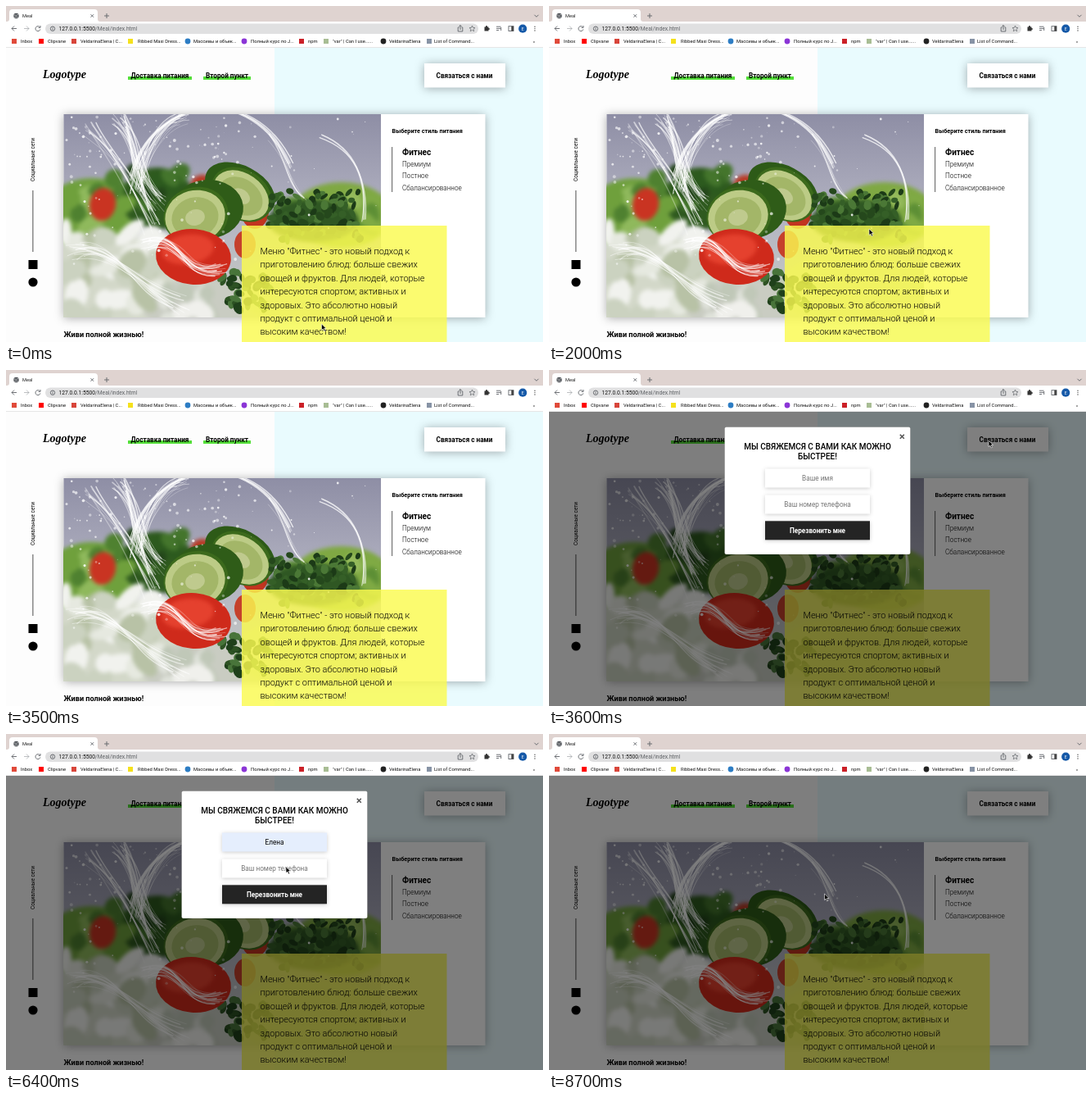
Write an HTML page that moves like this. It is 656 by 410 pixels and loops after 9000 ms.

```html
<!DOCTYPE html>
<html lang="ru">
<head>
<meta charset="utf-8">
<title>Meal</title>
<style>
html, body { margin: 0; width: 100%; height: 100%; overflow: hidden; background: #fff; }
svg { display: block; width: 656px; height: 410px; font-family: Roboto, sans-serif; }
text { white-space: pre; }
.card { filter: drop-shadow(0 1px 6px rgba(0, 0, 0, .32)); }
.field { filter: drop-shadow(0 1px 2.5px rgba(0, 0, 0, .2)); }
.soft { filter: blur(2.5px); }
.line { fill: none; stroke: #fff; stroke-linecap: round; }
.icon { fill: none; stroke: #5f6368; stroke-width: .9; }
</style>
</head>
<body>
<svg id="stage" viewBox="0 0 656 410"></svg>
<script>
const stage = document.getElementById('stage');
let seed = 11;
const rnd = (a, b) => {
  seed = (seed * 16807) % 2147483647;
  return a + (b - a) * seed / 2147483647;
};
const text = (x, y, s, size, weight = 400, attrs = '') =>
  `<text x="${x}" y="${y}" font-size="${size}" font-weight="${weight}" ${attrs}>${s}</text>`;
const mid = (y, s, size, weight, fill, id = '') =>
  text(328, y, s, size, weight, `text-anchor="middle" fill="${fill}" ${id && `id="${id}"`}`);
const rect = (x, y, w, h, fill, attrs = '') =>
  `<rect x="${x}" y="${y}" width="${w}" height="${h}" fill="${fill}" ${attrs}/>`;
const dot = (x, y, r, fill, attrs = '') =>
  `<circle cx="${x}" cy="${y}" r="${r}" fill="${fill}" ${attrs}/>`;
const oval = (x, y, rx, ry, turn, fill, attrs = '') =>
  `<ellipse rx="${rx}" ry="${ry}" fill="${fill}" transform="translate(${x} ${y}) rotate(${turn})" ${attrs}/>`;
const icon = (d, attrs = '') => `<path class="icon" d="${d}" ${attrs}/>`;
const repeat = (n, f) => Array.from({length: n}, (_, i) => f(i)).join('');

// Leaves scattered over a box
const leaves = (n, x, y, w, h, r, colors) => repeat(n, i =>
  oval(rnd(x, x + w), rnd(y, y + h), rnd(r / 2, r), rnd(r / 3, r * .7), rnd(0, 180), colors[i % colors.length]));
const slice = (x, y, rx, ry, turn) =>
  oval(x, y, rx, ry, turn, '#3c6a1c') + oval(x - 1, y + 1, rx - 3, ry - 3, turn, '#bccb86') +
  oval(x - 1, y + 2, rx * .72, ry * .7, turn, '#a3b668') + oval(x - 1, y + 2, rx * .3, ry * .28, turn, '#bfca8e');
// A bundle of thin water strands around one curve
const splash = (n, spread, points) => repeat(n, () => {
  const p = points.map(v => v + rnd(-spread, spread));
  return `<path class="line" d="M${p.slice(0, 2)}C${p.slice(2)}" stroke-width="${rnd(.4, 1.8)}" opacity="${rnd(.25, .75)}"/>`;
});

const photo = () => `<g clip-path="url(#frame)">
  ${rect(70, 132, 388, 248, 'url(#sky)')}
  <g class="soft">
    ${oval(105, 255, 60, 45, 0, '#70a03f')}${oval(185, 235, 45, 38, 0, '#2f5a1f')}
    ${leaves(16, 72, 210, 75, 60, 20, ['#6fa03c', '#8fb95c', '#4f8130'])}
    ${leaves(12, 155, 200, 60, 55, 16, ['#2c5a1e', '#44752c', '#23451a'])}
    ${oval(410, 255, 62, 40, 0, '#7fa843')}
    ${leaves(16, 345, 225, 110, 45, 20, ['#7faa44', '#94ba5b', '#5d8f35'])}
    ${oval(118, 242, 16, 20, 10, '#c93422')}${oval(240, 218, 14, 12, 0, '#b83a25')}
  </g>
  ${oval(304, 250, 17, 22, 0, '#c23420')}
  ${oval(286, 224, 46, 29, 28, '#2d5a17')}${slice(288, 230, 40, 30, 35)}
  ${oval(246, 248, 44, 36, -5, '#2f5c18')}${slice(232, 256, 40, 35, -15)}
  <g class="soft">
    ${oval(125, 340, 85, 62, 0, '#d3d8c9')}${oval(235, 365, 70, 32, 0, '#c9ccc2')}
    ${leaves(34, 72, 275, 125, 105, 22, ['#e6e9e0', '#cbd2c0', '#f1f2ee', '#b8c2a6'])}
    ${leaves(12, 190, 345, 85, 38, 16, ['#dfe2da', '#c0c8b8', '#f0f0ec'])}
    ${oval(375, 262, 55, 26, 0, '#2f5723')}${oval(375, 345, 95, 45, 0, '#c3cdb0')}
  </g>
  ${leaves(100, 318, 225, 115, 60, 7, ['#25481c', '#355f27', '#1c3a17', '#4b7836'])}
  ${leaves(45, 262, 325, 60, 45, 8, ['#2d5223', '#48743a', '#1f401b'])}
  ${oval(229, 306, 46, 34, 5, '#cf2a1b')}${oval(222, 297, 32, 18, -8, '#e5412e', 'class="soft"')}
  ${oval(292, 291, 13, 17, 0, '#c5402c')}
  ${splash(9, 4, [155, 210, 175, 110, 300, 90, 347, 195])}
  ${splash(4, 5, [325, 160, 345, 190, 345, 220, 362, 234])}
  ${splash(4, 3, [385, 160, 425, 175, 442, 210, 436, 262])}
  ${splash(24, 11, [140, 140, 165, 170, 155, 200, 185, 240])}
  ${splash(16, 9, [215, 136, 185, 145, 165, 185, 160, 225])}
  ${splash(10, 10, [100, 150, 130, 180, 150, 205, 178, 270])}
  ${splash(14, 8, [172, 290, 215, 275, 210, 330, 262, 322])}
  ${splash(14, 12, [85, 300, 130, 290, 160, 340, 215, 365])}
  ${repeat(150, i => dot(rnd(74, i % 3 ? 270 : 455), rnd(134, i % 2 ? 215 : 320), rnd(.4, 2), '#fff', `opacity="${rnd(.3, .85)}"`))}
</g>`;

const bookmarks = [
  [10, 18, '#e04a3a', 'Inbox'],
  [43, 51, '#f00', 'Clipvane'],
  [83, 91, '#d8453a', 'VeldarinaElena | C...'],
  [152, 161, '#f5e11c', 'Ribbed Maxi Dress...'],
  [222, 229, '#2d7dc4', 'Массивы и объек...', 1],
  [291, 299, '#8b35d6', 'Полный курс по J...', 1],
  [361, 369, '#cb2027', 'npm'],
  [391, 399, '#a8bd94', '"var" | Can I use......'],
  [461, 468, '#222', 'VeldarinaElena', 1],
  [517, 523, '#8793a5', 'List of Command...']
];

const browser = () => `
  ${rect(0, 0, 656, 51, '#fff')}${rect(0, 0, 656, 19, '#dfd3d0')}
  <path d="M1 19q3 0 3-3V8q0-4 4-4h100q4 0 4 4v8q0 3 3 3z" fill="#fff"/>
  ${dot(12.5, 12, 3.2, '#4b4f54')}${icon('M9.8 11q3 1 5.4-.6M10.2 14q2-1.6 4.6 0', 'style="stroke:#fff;stroke-width:.6"')}
  ${text(20, 14, 'Meal', 5.7, 400, 'fill="#222"')}
  ${icon('M103.5 10.2l3.6 3.6m0-3.6l-3.6 3.6M120 12h6m-3-3v6M645.5 10.8l2.5 2.5 2.5-2.5')}
  ${icon('M13 27.5H7m3-3l-3 3 3 3')}${icon('M22 27.5h6m-3-3l3 3-3 3', 'opacity=".45"')}
  ${icon('M41.5 26a3 3 0 1 0 .4 2.4M42 24v2.4h-2.4')}
  ${rect(48, 21.5, 529, 12.5, '#e0e0e1', 'rx="6.2"')}
  ${dot(57, 27.7, 2.7, 'none', 'class="icon"')}${icon('M57 27.2v2M57 25.7v.8')}
  ${text(64.5, 30, '127.0.0.1:5500<tspan fill="#5c5f63">/Meal/index.html</tspan>', 6.7, 400, 'fill="#111"')}
  ${icon('M553.5 26h-1.3v5h5.6v-5h-1.3M555 29v-5.5m-1.6 1.6l1.6-1.6 1.6 1.6')}
  ${icon('M569.5 24l1 2.4 2.5.2-1.9 1.7.6 2.5-2.2-1.4-2.2 1.4.6-2.5-1.9-1.7 2.5-.2z', 'style="stroke-width:.7"')}
  ${rect(584.5, 25.5, 5, 5, '#333')}${dot(587, 25.2, 1.1, '#333')}${dot(589.8, 28, 1.1, '#333')}
  ${icon('M599 25.2h5.5M599 27.4h5.5M599 29.6h3M604.7 26v4')}
  ${rect(614, 24.7, 6, 5.8, 'none', 'class="icon"')}${rect(617.3, 24.7, 2.7, 5.8, '#444')}
  ${dot(631.2, 27.7, 5.1, '#1559a8')}${text(631.2, 29.6, 'Е', 5.2, 400, 'text-anchor="middle" fill="#fff"')}
  ${[25.2, 27.6, 30].map(y => dot(646, y, .7, '#444')).join('')}
  ${bookmarks.map(([ix, x, color, name, round]) =>
    (round ? dot(ix, 43, 3.4, color) : rect(ix - 3, 40, 6, 6, color)) +
    text(x, 45, name, 5.8, 400, 'fill="#111"')).join('')}
  ${text(643.5, 45, '»', 6, 400, 'fill="#444"')}
  ${rect(0, 50.3, 656, .7, '#dcdcdc')}`;

const menu = ['Меню "Фитнес" - это новый подход к', 'приготовлению блюд: больше свежих',
  'овощей и фруктов. Для людей, которые', 'интересуются спортом; активных и',
  'здоровых. Это абсолютно новый', 'продукт с оптимальной ценой и', 'высоким качеством!'];

const page = () => `
  ${rect(0, 51, 656, 359, '#fdfdfd')}${rect(328, 51, 328, 359, '#e9fbfe')}
  ${text(45, 88, 'Logotype', 14, 700, 'font-style="italic" font-family="Liberation Serif, serif"')}
  ${rect(149, 86, 78, 4, '#54e039')}${rect(241, 86, 58, 4, '#54e039')}
  ${text(152.5, 88, 'Доставка питания', 8.2, 700)}${text(244, 88, 'Второй пункт', 8.2, 700)}
  ${rect(511, 70, 99, 29.5, '#fff', 'class="card"')}${text(560, 88, 'Связаться с нами', 8.2, 700, 'text-anchor="middle"')}
  ${text(0, 0, 'Социальные сети', 6.4, 400, 'transform="translate(35 214) rotate(-90)"')}
  ${rect(32.5, 225, .8, 75, '#222')}
  ${rect(27.5, 310, 11, 11, '#000')}${dot(33, 337, 5.6, '#000')}
  ${rect(70.5, 132, 515, 248, '#fff', 'class="card"')}
  ${photo()}
  ${text(471.5, 154.5, 'Выберите стиль питания', 7.3, 700)}
  ${rect(471.3, 172, .8, 55, '#333')}
  ${text(484, 181.5, 'Фитнес', 10, 700)}
  ${['Премиум', 'Постное', 'Сбалансированное'].map((s, i) => text(484, 196.3 + i * 14.1, s, 8.2, 300)).join('')}
  ${rect(288, 268, 250.5, 142, '#fafa50', 'opacity=".82"')}
  ${menu.map((s, i) => text(310.5, 303 + i * 16.4, s, 10.95, 300)).join('')}
  ${text(70.5, 404, 'Живи полной жизнью!', 9.1, 700)}`;

const list = (id, y, w, items) => `<g id="${id}">
  <g class="field">${rect(309.5, y, w, items.length * 16.5 + 2, '#fff', 'rx="1"')}
  <path d="M315 ${y}l4-3.5 4 3.5z" fill="#fff"/></g>
  ${rect(309.5, y, w, 16, '#e0e0e0', `id="${id}Hover"`)}
  ${items.map((s, i) => text(315, y + 10.6 + i * 16.4, s, 6.5)).join('')}</g>`;

const modal = () => `<g id="modal">
  ${rect(214.5, 69.5, 227, 155.5, '#fff', 'rx="2" stroke="#000" stroke-opacity=".25" stroke-width=".6"')}
  ${icon('M428.8 78.8l5 5m0-5l-5 5', 'style="stroke:#555;stroke-width:1.6"')}
  ${mid(97, 'МЫ СВЯЖЕМСЯ С ВАМИ КАК МОЖНО', 10, 500, '#000')}${mid(109, 'БЫСТРЕЕ!', 10, 500, '#000')}
  ${rect(264, 120.5, 128, 23, '#fff', 'class="field" id="nameBox"')}
  ${rect(264, 152.5, 128, 23, '#fff', 'class="field" id="phoneBox"')}
  ${rect(264, 184.3, 128, 23, '#242424', 'class="field"')}
  ${mid(135, '', 8.2, 400, '#757575', 'name')}${mid(166.7, '', 8.2, 400, '#757575', 'phone')}
  ${mid(198.5, 'Перезвонить мне', 8.2, 700, '#fff')}
  ${list('names', 149.5, 38.5, ['Елена', 'dfgdv', 'Elena', 'b f'])}
  ${list('phones', 181.3, 76.5, ['9005550142', '+7 (900) 555-01-42', 'dgsvdgs'])}</g>`;

stage.innerHTML = `<defs>
  <clipPath id="frame">${rect(70.5, 132, 387.5, 248, '#000')}</clipPath>
  <linearGradient id="sky" x2="0" y2="1"><stop stop-color="#8e8ea5"/><stop offset=".5" stop-color="#b3b3c2"/><stop offset="1" stop-color="#c9cfc4"/></linearGradient>
  </defs>${page()}${rect(0, 51, 656, 359, '#000', 'id="shade" opacity=".5"')}${modal()}${browser()}
  <path id="cursor" d="M0 0v7.6l1.8-1.6 1.3 2.9 1.4-.6-1.3-2.8h2.4z" stroke="#fff" stroke-width=".6"/>`;

const $ = id => document.getElementById(id);
const show = (id, on) => $(id).setAttribute('visibility', on ? 'inherit' : 'hidden');

// Time, x, y of the pointer's tip
const track = [[0, 385.5, 388], [1000, 388, 350], [2000, 391, 272], [3000, 408, 262], [3200, 537, 86],
  [3700, 537, 86], [4400, 340, 131], [4700, 340, 131], [5200, 345, 158], [5600, 345, 158], [6400, 342, 162],
  [6900, 342, 162], [7300, 337, 184], [7900, 337, 184], [8150, 374, 203], [8400, 336.5, 195], [9000, 336.5, 195]];

function pointer(t) {
  const i = track.findIndex(k => k[0] > t), [t0, x0, y0] = track[i - 1], [t1, x1, y1] = track[i];
  const p = (t - t0) / (t1 - t0), e = p * p * (3 - 2 * p);
  return [x0 + (x1 - x0) * e, y0 + (y1 - y0) * e];
}

function fill(id, t, preview, done, hint, value) {
  const on = t >= preview, set = t >= done, el = $(id);
  el.textContent = on ? value : hint;
  el.setAttribute('font-size', on && !set ? 6.3 : 8.2);
  el.setAttribute('fill', on ? '#000' : '#757575');
  $(id + 'Box').setAttribute('fill', on ? '#e5eefd' : '#fff');
}

function draw(now) {
  const t = Math.floor(now % 9000 / 100) * 100;
  show('shade', t >= 3600);
  show('modal', t >= 3600 && t < 8700);
  show('names', t >= 4600 && t < 5500);
  show('namesHover', t >= 5000 && t < 5500);
  show('phones', t >= 6600 && t < 7700);
  show('phonesHover', t >= 7100 && t < 7700);
  fill('name', t, 5000, 5500, 'Ваше имя', 'Елена');
  fill('phone', t, 7100, 7700, 'Ваш номер телефона', '9005550142');
  show('cursor', t !== 3500);
  $('cursor').setAttribute('transform', `translate(${pointer(t)})`);
}

let start;
function loop(now) {
  start ??= now;
  draw(now - start);
  requestAnimationFrame(loop);
}
draw(0);
requestAnimationFrame(loop);
</script>
</body>
</html>
```
